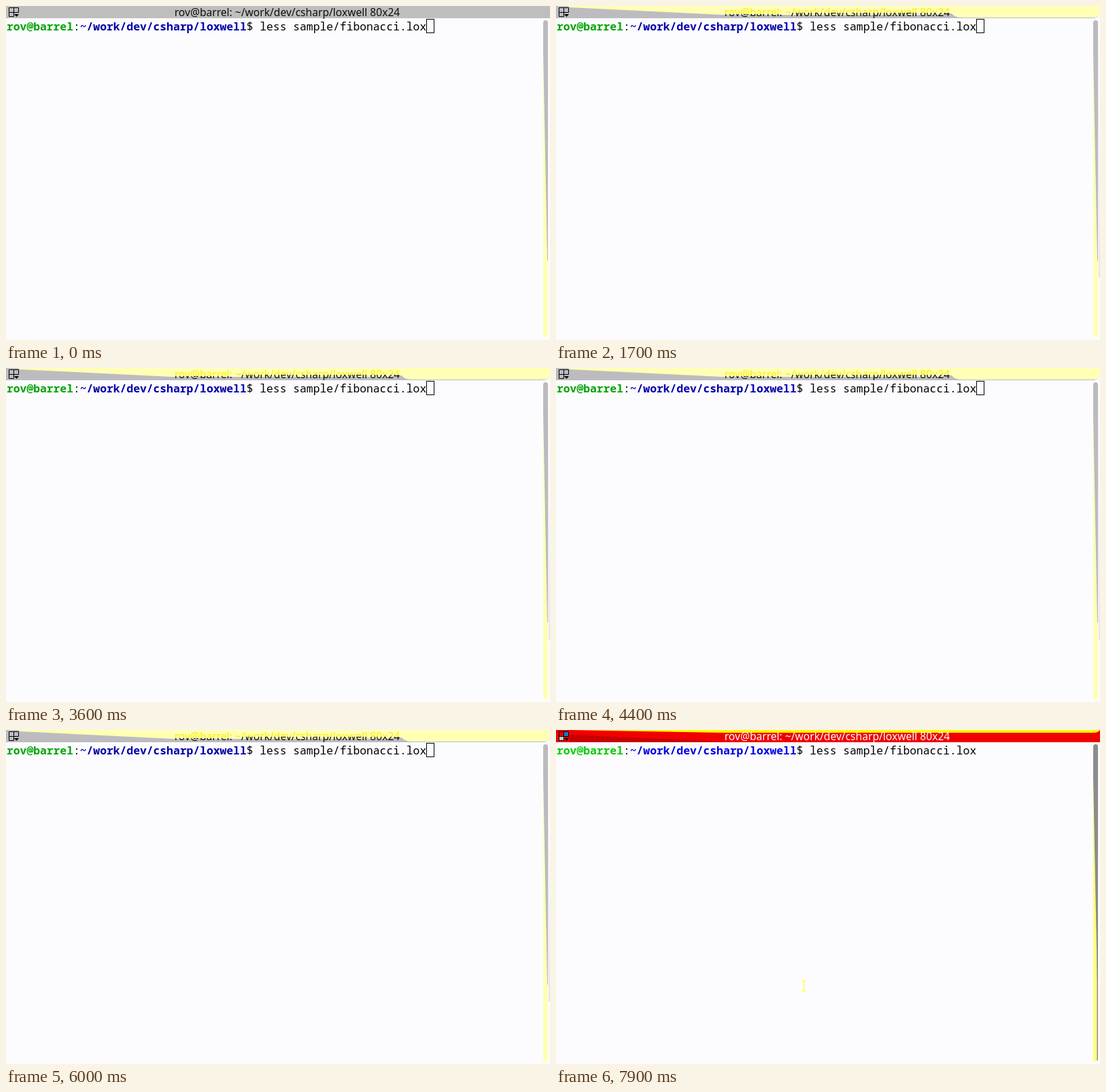
These frames come from a looping animation (800x492 px, 8 s). An HTML page:

```html
<!DOCTYPE html>
<html lang="en">
<head>
<meta charset="utf-8">
<title>Terminal</title>
<style>
  html, body { margin: 0; width: 100%; height: 100%; overflow: hidden; background: #fcfcff; }
  svg { display: block; width: 800px; height: 492px; }
  .title { font: 15.6px "Noto Sans", "Open Sans", sans-serif; text-anchor: middle; }
  .line { font: 16.33px "Noto Sans Mono", "DejaVu Sans Mono", monospace; fill: #000; }
  .line .bold { font-weight: 700; }
  .user { fill: #00a400; }
  .path { fill: #0000aa; }
  .focused .user { fill: #00cc00; }
  .focused .path { fill: #0000e8; }
  .track { fill: #ffffb4; }
  .thumb { fill: #bbbbbf; }
  .focused .track { fill: #ffff7c; }
  .focused .thumb { fill: #8c8c8c; }
</style>
</head>
<body>
<svg id="stage" viewBox="0 0 800 492">
  <defs>
    <text id="title" class="title" x="413.5" y="15">rov@barrel: ~/work/dev/csharp/loxwell 80x24</text>
    <clipPath id="upper"><path d="M0 0H800V10H335L330 12H0Z"/></clipPath>
    <clipPath id="lower"><path d="M0 18H800V10H335L330 12H0Z"/></clipPath>
    <clipPath id="bar"><rect x="790" y="21" width="7" height="467" rx="3.5"/></clipPath>
  </defs>
  <rect width="800" height="492" fill="#fcfcff"/>

  <g id="plain">
    <rect width="800" height="18" fill="#bebebe"/>
    <use href="#title" fill="#101010"/>
  </g>

  <g id="faded">
    <rect width="800" height="18" fill="#bcbcc0"/>
    <path d="M18 0H800V12Q798 17 791 17H598Q586 17 582 11L560 13H245L20 2Z" fill="#ffffb6"/>
    <path d="M800 12Q798 17 791 18H800Z" fill="#fcfcff"/>
    <use href="#title" fill="#f8f000" clip-path="url(#upper)"/>
    <use href="#title" fill="#101010" clip-path="url(#lower)"/>
  </g>

  <g id="active">
    <rect width="800" height="18" fill="#f00000"/>
    <path d="M20 7L245 17V18H20Z" fill="#c80000"/>
    <path d="M20 0H800Q797 4 791 4H245Z" fill="#ffff00"/>
    <use href="#title" fill="#fff"/>
  </g>

  <g id="icon" stroke="#000" fill="none">
    <g id="tints" stroke="none">
      <rect x="5" y="3" width="6" height="6" fill="#e00000"/>
      <rect x="12" y="3" width="6" height="6" fill="#1878c8"/>
      <rect x="5" y="10" width="6" height="6" fill="#c8c8c8"/>
    </g>
    <path d="M18.500 9.500V2.500H4.500V15.500H11.500M11.500 2.500V15.500M4.500 9.500H18.500"/>
    <path d="M12 12H19L15.500 16Z" fill="#000" stroke="none"/>
  </g>

  <g clip-path="url(#bar)">
    <rect class="track" x="790" y="21" width="7" height="467"/>
    <path class="thumb" d="M790 21H797V375H796L790 70Z"/>
    <rect id="edge" class="thumb" x="795.500" y="22" width="1.500" height="465"/>
  </g>
  <path id="shade" d="M797 24L800 400H798Z" fill="#e4e4ee"/>

  <text class="line" x="1" y="36"><tspan class="bold user">rov@barrel</tspan>:<tspan class="bold path">~/work/dev/csharp/loxwell</tspan>$ less sample/fibonacci.lox</text>
  <rect id="caret" x="618.500" y="19.500" width="11" height="20" stroke="#000" fill="none"/>

  <path id="pointer" d="M-3 -8H-1L0 -7L1 -8H3M0 -7V7M-3 8H-1L0 7L1 8H3" fill="none"/>
</svg>
<script>
  const LOOP = 8000, STEP = 100;
  const FADE = 100, ENTER = 6700, FOCUS = 7300, BLINK = 7900;
  const el = id => document.getElementById(id);
  const show = (id, on) => el(id).style.display = on ? "" : "none";

  function draw(now) {
    const t = Math.floor(now % LOOP / STEP) * STEP;
    const focused = t >= FOCUS, faded = t >= FADE && !focused;
    el("stage").classList.toggle("focused", focused);
    show("plain", t < FADE);
    show("faded", faded);
    show("shade", faded);
    show("active", focused);
    show("tints", focused);
    show("edge", focused);

    show("caret", t < BLINK);
    el("caret").setAttribute("fill", focused ? "#000" : "none");

    // The pointer drifts up and to the left.
    const k = (t - 6900) / 1000;
    show("pointer", t >= ENTER);
    el("pointer").setAttribute("transform", `translate(${Math.round(509 - 145 * k) + .5} ${Math.round(438 - 61 * k)})`);
    el("pointer").setAttribute("stroke", focused ? "#ffff00" : "#ffff40");
  }

  function tick() {
    draw(performance.now());
    requestAnimationFrame(tick);
  }
  tick();
</script>
</body>
</html>
```
